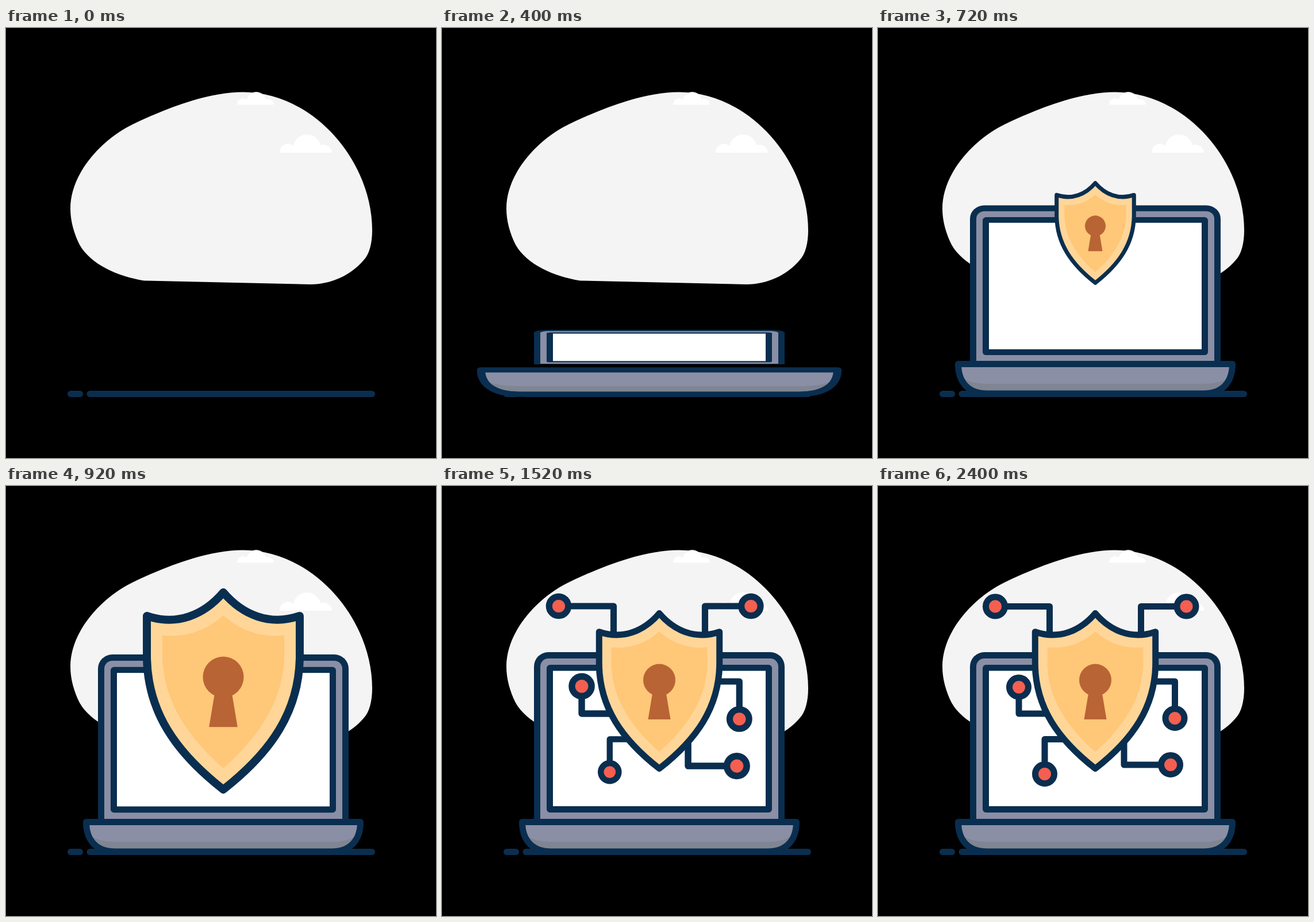
Write an HTML page that moves like this. It is 748 by 748 pixels and loops after 3.08 s.

```html
<!DOCTYPE html>
<html lang="en">
<head>
<meta charset="utf-8">
<title>Shielded laptop</title>
<style>
  html, body { margin: 0; width: 100%; height: 100%; overflow: hidden; background: #000; }
  svg { display: block; width: 100%; height: 100%; }
  .ink { stroke: #0a2e4f; stroke-width: 11; stroke-linecap: round; stroke-linejoin: round; }
  .dark { fill: #0a2e4f; }
  .metal { fill: #8a8fa5; }
  .wire { fill: none; }
  .dot { fill: #f55f50; }
</style>
</head>
<body>
<svg viewBox="0 0 748 748">
  <defs>
    <path id="cloud" d="M476 217A14.5 14.5 0 0 1 500 205A24 24 0 0 1 547 204A14.5 14.5 0 0 1 567 217Z"/>
    <path id="tray" d="M139.5 584.5H616.5C616.5 615 600 636 566 636H190C156 636 139.5 615 139.5 584.5Z"/>
  </defs>

  <path fill="#f4f4f4" d="M412 111.5C535 111.5 637 232 637 352C637 374 632 394 622 404C600 430 565 446 530 446L240 439.5C195 432 148 412 128 377C118 357 112 335 112 314C112 255 162 200 210 173C245 155 285 138 325 126C355 117 385 111.5 412 111.5Z"/>
  <g fill="#fff">
    <use href="#cloud"/>
    <use href="#cloud" transform="translate(402 133.5) scale(.703) translate(-476 -217)"/>
  </g>

  <g id="screen">
    <path class="dark" d="M160 585V314A25 25 0 0 1 185 289H571A25 25 0 0 1 596 314V585Z"/>
    <path class="metal" d="M171 580V314A14 14 0 0 1 185 300H571A14 14 0 0 1 585 314V580Z"/>
    <rect class="dark" x="182" y="311" width="392" height="257" rx="6"/>
    <rect fill="#fff" x="193" y="321.5" width="370" height="235.5"/>
  </g>

  <path class="ink wire" d="M112.5 636.5H128.5M146 636.5H636.5"/>

  <g id="base">
    <use href="#tray" fill="#7f8592"/>
    <path class="metal" d="M139.5 584.5H616.5V600C611 612 590 619 566 619H190C166 619 145 612 139.5 600Z"/>
    <use href="#tray" class="ink wire"/>
  </g>

  <g id="links"></g>

  <g id="shield">
    <path class="ink" fill="#ffd698" d="M378 221.5C352 252 315 268 273.3 253.7V312C275 385 312 440 378 491.5C444 440 481 385 482.7 312V253.7C441 268 404 252 378 221.5Z"/>
    <path fill="#ffc778" d="M378 253C356 273 327 284 294.5 280.5V312C297 372 330 420 378 462.4C426 420 459 372 461.5 312V280.5C429 284 400 273 378 253Z"/>
    <g fill="#b86435">
      <circle cx="378" cy="337.5" r="28"/>
      <path d="M367 355H389L397.5 406H358.5Z"/>
    </g>
  </g>
</svg>
<script>
const LOOP = 3080, STEP = 40, END = 2400;
const $ = id => document.getElementById(id);

// Sine rise to 1 + over, then a soft settle to 1
function pop(t, over, rise, fall) {
  if (t <= 0) return 0;
  if (t < rise) return (1 + over) * Math.sin(Math.PI / 2 * t / rise);
  const p = Math.min((t - rise) / fall, 1);
  return 1 + over * Math.cos(Math.PI / 2 * p) ** 2;
}

// Vertical offset of the base as it falls in and swings back
function drop(t) {
  const p = Math.min(t / 400, 1);
  return -350 * (1 - p) ** 2 * Math.cos(1.35 * Math.PI * p);
}

function place(el, ox, oy, sx, sy = sx, dy = 0) {
  const shown = sx > 0 && sy > 0;
  el.setAttribute('visibility', shown ? 'visible' : 'hidden');
  if (shown) el.setAttribute('transform',
    `translate(${ox} ${oy + dy}) scale(${sx} ${sy}) translate(${-ox} ${-oy})`);
}

// Node centre, wire, scale origin, start time
const links = [
  [204, 209.5, 'H298.5V260', 298, 255, 890],
  [536.5, 209.5, 'H457.5V260', 458, 255, 890],
  [516.5, 404, 'V340H480', 480, 340, 930],
  [245, 350, 'V396H300', 300, 396, 980],
  [509, 485, 'H428V440', 427, 440, 1160],
  [290, 501, 'V440.5H330', 322, 440, 1240]
].map(([x, y, wire, ox, oy, start]) => {
  const el = document.createElementNS('http://www.w3.org/2000/svg', 'g');
  el.setAttribute('class', 'ink');
  el.innerHTML = `<path class="wire" d="M${x} ${y}${wire}"/><circle class="dot" cx="${x}" cy="${y}" r="16.5"/>`;
  $('links').append(el);
  return { el, ox, oy, start };
});

function draw(time) {
  const t = Math.min(Math.floor(time % LOOP / STEP) * STEP, END);
  const wide = pop(t, .3, 400, 255);
  place($('base'), 378, 641, wide, 1 - .6 * (wide - 1), drop(t));
  place($('screen'), 378, 585, 1, 1 - Math.exp(-.0078 * (t - 371)));
  place($('shield'), 378, 356.5, pop(t - 618, .27, 302, 408));
  for (const { el, ox, oy, start } of links)
    place(el, ox, oy, pop(t - start, .06, 400, 320));
}

const begin = performance.now();
function tick() {
  draw(performance.now() - begin);
  requestAnimationFrame(tick);
}
tick();
</script>
</body>
</html>
```
